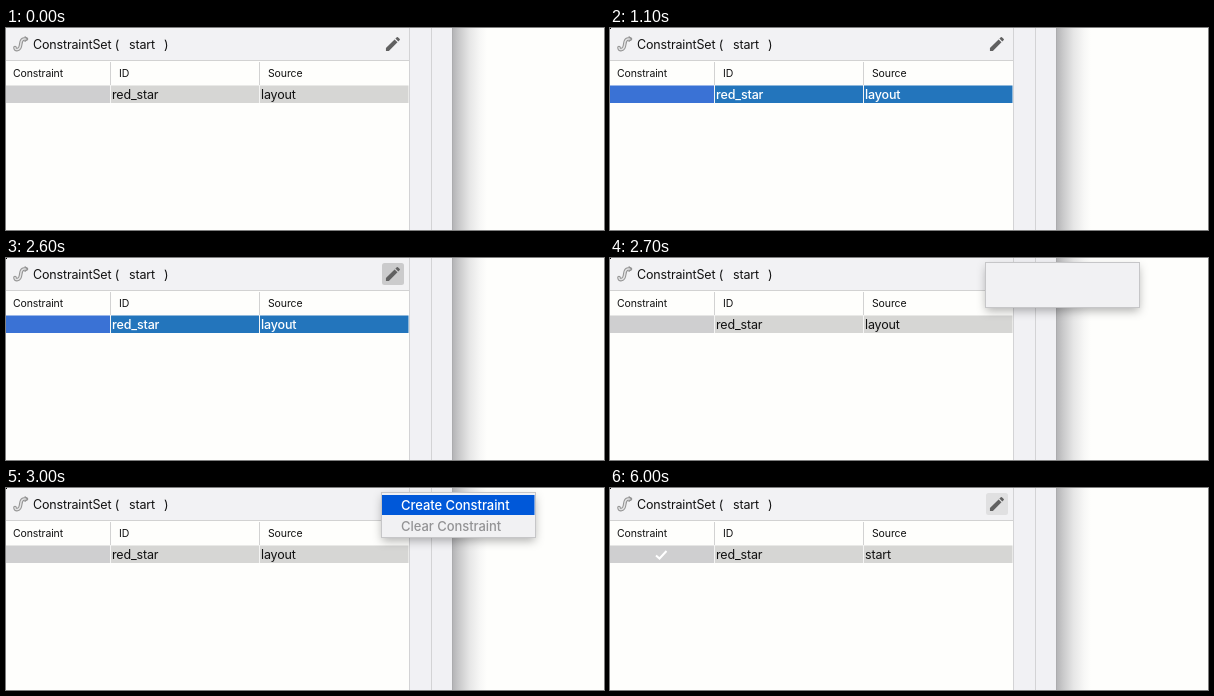
Write an HTML page that moves like this. It is 598x202 px and loops after 7.3 s.

```html
<!DOCTYPE html>
<html lang="en">
<head>
<meta charset="utf-8">
<title>Create constraint</title>
<style>
html, body { margin: 0; width: 100%; height: 100%; overflow: hidden; background: #fefefc; }
svg { display: block; width: 598px; height: 202px; }
text { font-family: Inter, "Open Sans", sans-serif; font-size: 12.5px; letter-spacing: -.15px; fill: #111; white-space: pre; }
.head { font-size: 10.5px; letter-spacing: -.12px; }
.menu { font-size: 13px; font-weight: 500; letter-spacing: -.05px; }
</style>
</head>
<body>
<svg viewBox="0 0 598 202">
  <defs>
    <linearGradient id="edge">
      <stop offset="0" stop-color="#b2b2b4"/>
      <stop offset=".2" stop-color="#c9c9ca"/>
      <stop offset=".5" stop-color="#e6e6e6"/>
      <stop offset=".8" stop-color="#f7f7f6"/>
      <stop offset="1" stop-color="#fefefc"/>
    </linearGradient>
    <filter id="shadow" x="-20%" y="-40%" width="140%" height="200%">
      <feDropShadow dx="0" dy="4" stdDeviation="5" flood-color="#000" flood-opacity=".3"/>
    </filter>
  </defs>

  <rect width="598" height="202" fill="#fefefc"/>
  <rect x="446" width="35" height="202" fill="url(#edge)"/>
  <rect x="403" width="43" height="202" fill="#f1f1f4"/>
  <path d="M403.5 0V202M425.5 0V202" stroke="#d3d3d5"/>
  <path d="M446.5 0V202" stroke="#acacae"/>

  <rect width="403" height="32" fill="#f2f2f4"/>
  <path d="M0 32.5H403" stroke="#d2d2d2"/>
  <g fill="none" stroke-linecap="round" stroke-linejoin="round">
    <path id="curve" d="M9 19.5Q9 22 11.5 21.5C17 20.5 12.5 11.5 18 11H20.5" stroke="#929292" stroke-width="3.6"/>
    <path d="M9 19.5Q9 22 11.5 21.5C17 20.5 12.5 11.5 18 11H20.5" stroke="#e2e2e3" stroke-width="1.5"/>
    <path d="M19 8.8L21.5 11L19 13.4" stroke="#929292" stroke-width="1.2"/>
  </g>
  <text x="27" y="21">ConstraintSet (</text>
  <text x="123" y="21">start</text>
  <text x="158" y="21">)</text>

  <rect id="button" x="376" y="5" width="22" height="22" rx="2.5"/>
  <path transform="translate(377.6 6.6) scale(.78)" fill="#616161" d="M3 17.25V21h3.75L17.81 9.94l-3.75-3.75L3 17.25zM20.71 7.04a1 1 0 0 0 0-1.41l-2.34-2.34a1 1 0 0 0-1.41 0l-1.83 1.83 3.75 3.75 1.83-1.83z"/>

  <text class="head" x="7" y="49">Constraint</text>
  <text class="head" x="113" y="49">ID</text>
  <text class="head" x="262" y="49">Source</text>
  <path d="M104.5 34V57M253.5 34V57" stroke="#d2d2d2"/>

  <rect id="cell" y="57.5" width="104" height="17.5"/>
  <rect id="row" x="104" y="57.5" width="298.5" height="17.5"/>
  <path d="M104.5 57V75M253.5 57V75" stroke="#f4f4f3"/>
  <text id="name" x="106" y="71">red_star</text>
  <text id="from" x="255" y="71">layout</text>
  <path id="check" d="M46 67.5L49.5 70.5L56.5 63" fill="none" stroke="#fff" stroke-width="2"/>

  <g id="menu">
    <rect x="376" y="5" width="153" height="44" fill="#f1f1f3" filter="url(#shadow)"/>
    <rect x="375.5" y="4.5" width="154" height="45" fill="none" stroke="#c6c6c8"/>
    <g id="items">
      <rect x="376" y="7" width="152.5" height="20" fill="#0058d9"/>
      <text class="menu" x="395" y="22" style="fill:#fff">Create Constraint</text>
      <text class="menu" x="395" y="43" style="fill:#939395">Clear Constraint</text>
    </g>
  </g>
  <rect id="dot" width="1" height="1" fill="#000"/>
</svg>
<script>
const LOOP = 7300;
const el = id => document.getElementById(id);
const show = (id, on) => el(id).setAttribute('visibility', on ? 'visible' : 'hidden');
const fill = (id, color) => el(id).setAttribute('fill', color);

function draw(t) {
  const selected = t >= 1100 && t < 2700;
  const pressed = t >= 2600 && t < 2700;
  const open = t >= 2700 && t < 6000;
  const done = t >= 6000;

  fill('cell', selected ? '#3a72d5' : '#cfcfd0');
  fill('row', selected ? '#2375bc' : '#d6d6d4');
  for (const id of ['name', 'from']) {
    el(id).style.fill = selected ? '#fff' : '#111';
    el(id).style.fontWeight = selected ? 500 : 400;
  }
  el('from').textContent = done ? 'start' : 'layout';

  fill('button', pressed ? '#cbcbcc' : '#e0e0e1');
  show('button', pressed || done);
  show('check', done);
  show('menu', open);
  show('items', open && t >= 2800);
  show('dot', t >= 300);
}

const began = performance.now();
function tick() {
  draw((performance.now() - began) % LOOP);
  requestAnimationFrame(tick);
}
draw(0);
requestAnimationFrame(tick);
</script>
</body>
</html>
```
